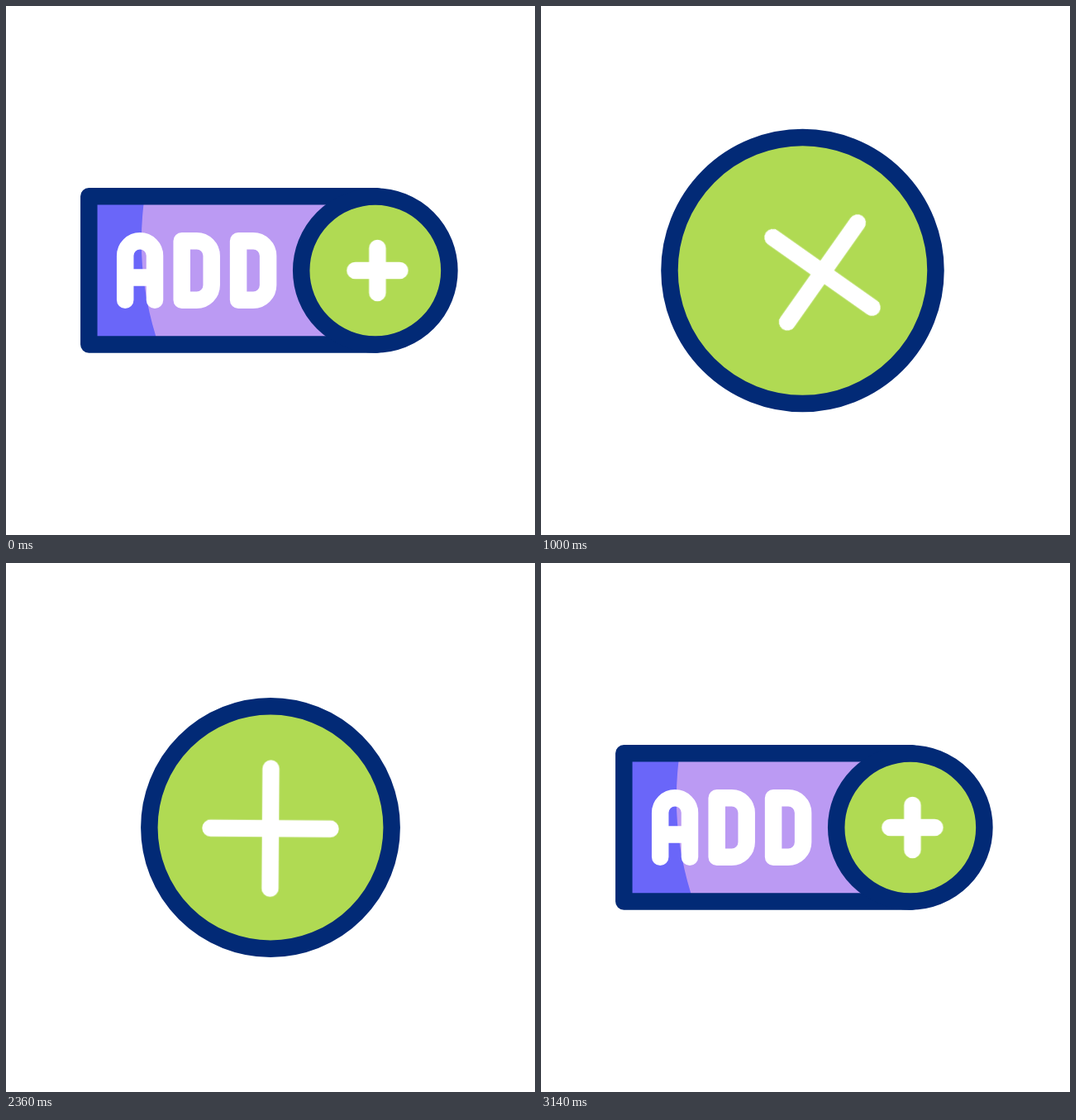
An HTML page that plays this animation: 640x640 px, repeating every 3600 ms.

```html
<!DOCTYPE html>
<html lang="en">
<head>
<meta charset="utf-8">
<title>Add button</title>
<style>
  html, body { margin: 0; width: 100%; height: 100%; overflow: hidden; background: #fff; }
  svg { display: block; width: 100vw; height: 100vh; }

  .frame, .disc { stroke: #022a76; stroke-width: 20.5; stroke-linejoin: round; }
  .letter, .bars { fill: none; stroke: #fff; stroke-width: 20.5; stroke-linecap: round; stroke-linejoin: round; }

  .body, .disc, .letter, .spot, .spin, .bars {
    animation: 3.6s ease-in-out infinite;
  }
  .body { y: 230.3px; height: 179.3px; animation-name: body; }
  .disc { fill: #b0da53; animation-name: slide, grow; }
  .a { animation-name: a; }
  .d1 { animation-name: d1; }
  .d2 { animation-name: d2; }
  .spot { animation-name: spot; }
  .spin { animation-name: spin; }
  .bars { animation-name: bars; }

  /* label plate */
  @keyframes body {
    0%, 15% { x: 100.3px; width: 349px; animation-timing-function: cubic-bezier(.85, 0, .85, 1); }
    30.278%, 60% { x: 226px; width: 84px; }
    68.333% { x: 210px; width: 100px; animation-timing-function: cubic-bezier(.9, 0, .155, 1); }
    82.222%, 100% { x: 100.3px; width: 349px; }
  }
  @keyframes a {
    0%, 15% { transform: none; animation-timing-function: cubic-bezier(.85, 0, .85, 1); }
    30.278%, 60% { transform: translateX(180px); }
    68.333% { transform: translateX(130px); animation-timing-function: cubic-bezier(.9, 0, .155, 1); }
    82.222%, 100% { transform: none; }
  }
  @keyframes d1 {
    0%, 15% { transform: none; animation-timing-function: cubic-bezier(.85, 0, .85, 1); }
    30.278%, 60% { transform: translateX(205px); }
    69.444% { transform: translateX(130px); animation-timing-function: cubic-bezier(.9, 0, .155, 1); }
    84.722%, 100% { transform: none; }
  }
  @keyframes d2 {
    0%, 15% { transform: none; animation-timing-function: cubic-bezier(.85, 0, .85, 1); }
    30.278%, 69.444% { transform: translateX(120px); animation-timing-function: cubic-bezier(.9, 0, .155, 1); }
    86.389%, 100% { transform: none; }
  }

  /* green disc */
  @keyframes slide {
    0%, 2.778% { cx: 446.8px; }
    15% { cx: 458.5px; animation-timing-function: cubic-bezier(.6, 0, .59, 1); }
    30.278% { cx: 307px; }
    37.778% { cx: 325px; }
    45%, 68.333% { cx: 320px; animation-timing-function: cubic-bezier(.9, 0, .155, 1); }
    82.222%, 100% { cx: 446.8px; }
  }
  @keyframes grow {
    0%, 15% { r: 89.6px; animation-timing-function: cubic-bezier(.6, 0, .63, 1); }
    30.278% { r: 166.8px; }
    37.778% { r: 137.8px; }
    45% { r: 147.8px; }
    52.778%, 60% { r: 142.8px; }
    68.333% { r: 147.8px; animation-timing-function: cubic-bezier(.9, 0, .155, 1); }
    82.222%, 100% { r: 89.6px; }
  }

  /* plus sign */
  @keyframes spot {
    0%, 2.778% { transform: translate(449.4px, 320px); }
    20.556% { transform: translate(461px, 320px); animation-timing-function: cubic-bezier(.85, 0, .55, 1); }
    30.278% { transform: translate(307px, 323px); }
    37.778% { transform: translate(325px, 321px); }
    45%, 68.333% { transform: translate(320px, 321.2px); animation-timing-function: cubic-bezier(.9, 0, .155, 1); }
    82.222%, 100% { transform: translate(449.4px, 320px); }
  }
  @keyframes spin {
    0%, 15% { transform: rotate(0deg); animation-timing-function: cubic-bezier(.8, 0, .8, 1); }
    30.278% { transform: rotate(-190deg); }
    37.778% { transform: rotate(-172deg); }
    45%, 68.333% { transform: rotate(-179.6deg); animation-timing-function: cubic-bezier(.9, 0, .155, 1); }
    82.222%, 100% { transform: rotate(0deg); }
  }
  @keyframes bars {
    0%, 2.778% { d: path("M-27 0H27M0 -27V27"); }
    20.556% { d: path("M-17.5 0H17.5M0 -17.5V17.5"); animation-timing-function: cubic-bezier(.85, 0, .55, 1); }
    30.278% { d: path("M-89 0H89M0 -89V89"); }
    37.778% { d: path("M-64 0H64M0 -64V64"); }
    45% { d: path("M-69.5 0H69.5M0 -69.5V69.5"); }
    52.778%, 60% { d: path("M-67.2 0H67.2M0 -67.2V67.2"); }
    68.333% { d: path("M-74 0H74M0 -74V74"); animation-timing-function: cubic-bezier(.8, 0, .3, 1); }
    79.167% { d: path("M-25.4 0H25.4M0 -25.4V25.4"); }
    87.222%, 100% { d: path("M-27 0H27M0 -27V27"); }
  }
</style>
</head>
<body>
<svg viewBox="0 0 640 640" role="img" aria-label="ADD +">
  <defs>
    <clipPath id="plate"><rect class="body"/></clipPath>
    <path id="d" d="M212.7 284.3h18a18 18 0 0 1 18 18v35.4a18 18 0 0 1 -18 18h-18z"/>
  </defs>

  <rect class="body" fill="#bb9af3"/>
  <g clip-path="url(#plate)">
    <path fill="#6a66f9" d="M90 220V420H188L181.3 399.6Q157 320 166.5 240L169 220z"/>
  </g>
  <path class="letter a" d="M144.2 355.8V302.1a17.9 17.9 0 0 1 35.8 0V355.8M144.2 328.6H180"/>
  <use class="letter d1" href="#d"/>
  <g class="letter d2"><use href="#d" x="68.4"/></g>
  <rect class="body frame" fill="none"/>

  <circle class="disc" cy="320"/>
  <g class="spot"><g class="spin"><path class="bars" d="M-27 0H27M0 -27V27"/></g></g>
</svg>
</body>
</html>
```
